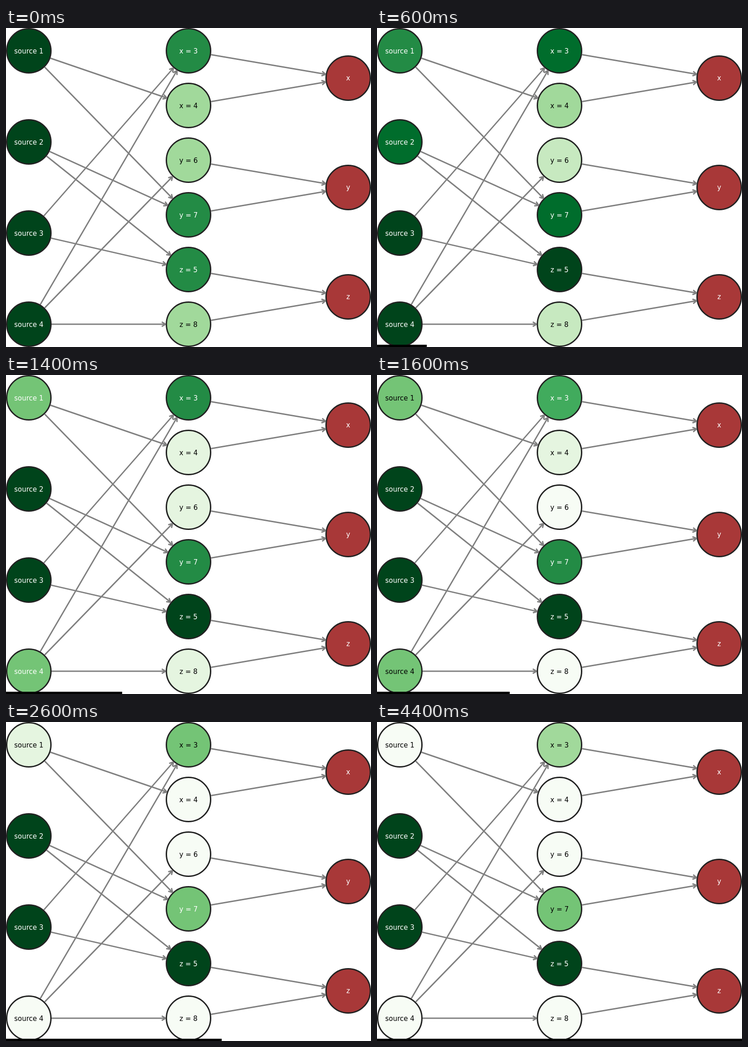
An HTML page with a canvas for the animation above (4600 ms loop, 800x700 px).

```html
<!DOCTYPE html>
<html lang="en">
<head>
<meta charset="utf-8">
<title>Trust and belief network</title>
<style>
  html, body { margin: 0; width: 100%; height: 100%; overflow: hidden; background: #fff; }
  canvas { display: block; }
</style>
</head>
<body>
<canvas id="stage" width="800" height="700"></canvas>
<script>
const ctx = document.getElementById('stage').getContext('2d');
const STEP_MS = 200, STEPS = 23, RADIUS = 50;
const GREENS = ['#f7fcf5', '#e5f5e0', '#c7e9c0', '#a1d99b', '#74c476',
                '#41ab5d', '#238b45', '#006d2c', '#00441b'];

const place = (labels, x, top, gap) =>
  labels.map((label, i) => ({ label, x, y: top + i * gap }));
const sources = place(['source 1', 'source 2', 'source 3', 'source 4'], 50, 50, 200);
const claims = place(['x = 3', 'x = 4', 'y = 6', 'y = 7', 'z = 5', 'z = 8'], 400, 50, 120);
const variables = place(['x', 'y', 'z'], 750, 110, 240);

// Claims made by each source
const made = [[1, 3], [3, 4], [0, 4], [0, 2, 5]];

const edges = [
  ...made.flatMap((list, s) => list.map(c => [sources[s], claims[c]])),
  ...claims.map((claim, c) => [claim, variables[c >> 1]])
];

const normalise = values => {
  const top = Math.max(...values);
  return values.map(v => v / top);
};

// Investment algorithm: sources split their trust over their claims,
// then earn back belief in proportion to their stake.
function stakes(trust) {
  const totals = claims.map(() => 0);
  made.forEach((list, s) => list.forEach(c => { totals[c] += trust[s] / list.length; }));
  return totals;
}

function nextState({ trust, belief }) {
  const totals = stakes(trust);
  const earned = normalise(made.map((list, s) =>
    list.reduce((sum, c) => sum + belief[c] * trust[s] / list.length / totals[c], 0)));
  return { trust: earned, belief: normalise(stakes(earned).map(v => v ** 1.2)) };
}

const votes = claims.map((_, c) => made.filter(list => list.includes(c)).length);
const states = [{ trust: [1, 1, 1, 1], belief: votes.map(v => v / 3) }];
while (states.length < STEPS) states.push(nextState(states[states.length - 1]));

function drawNode({ label, x, y }, fill, ink) {
  ctx.beginPath();
  ctx.arc(x, y, RADIUS - 1.5, 0, 2 * Math.PI);
  ctx.fillStyle = fill;
  ctx.fill();
  ctx.strokeStyle = '#222';
  ctx.stroke();
  ctx.fillStyle = ink;
  ctx.fillText(label, x, y + (label.length > 1 ? 6 : 5));
}

function drawValue(node, value) {
  const shade = GREENS[Math.min(8, Math.floor(value * 9))];
  drawNode(node, shade, value > 0.5 ? '#fff' : '#000');
}

function drawEdge([from, to]) {
  const angle = Math.atan2(to.y - from.y, to.x - from.x);
  const dx = RADIUS * Math.cos(angle), dy = RADIUS * Math.sin(angle);
  const tipX = to.x - dx, tipY = to.y - dy;
  ctx.beginPath();
  ctx.moveTo(from.x + dx, from.y + dy);
  ctx.lineTo(tipX, tipY);
  for (const turn of [-Math.PI / 6, Math.PI / 6]) {
    ctx.moveTo(tipX, tipY);
    ctx.lineTo(tipX - 10 * Math.cos(angle + turn), tipY - 10 * Math.sin(angle + turn));
  }
  ctx.strokeStyle = '#808080';
  ctx.stroke();
}

function draw(step) {
  const { trust, belief } = states[step];
  ctx.fillStyle = '#fff';
  ctx.fillRect(0, 0, 800, 700);
  ctx.lineWidth = 3;
  ctx.font = '15px "DejaVu Sans", sans-serif';
  ctx.textAlign = 'center';
  sources.forEach((node, i) => drawValue(node, trust[i]));
  claims.forEach((node, i) => drawValue(node, belief[i]));
  variables.forEach(node => drawNode(node, '#a83838', '#fff'));
  edges.forEach(drawEdge);
  ctx.fillStyle = '#000';
  ctx.fillRect(0, 695, 800 * step / (STEPS - 1), 5);
}

const start = performance.now();
function tick() {
  draw(Math.floor((performance.now() - start) / STEP_MS) % STEPS);
  requestAnimationFrame(tick);
}
tick();
</script>
</body>
</html>
```
